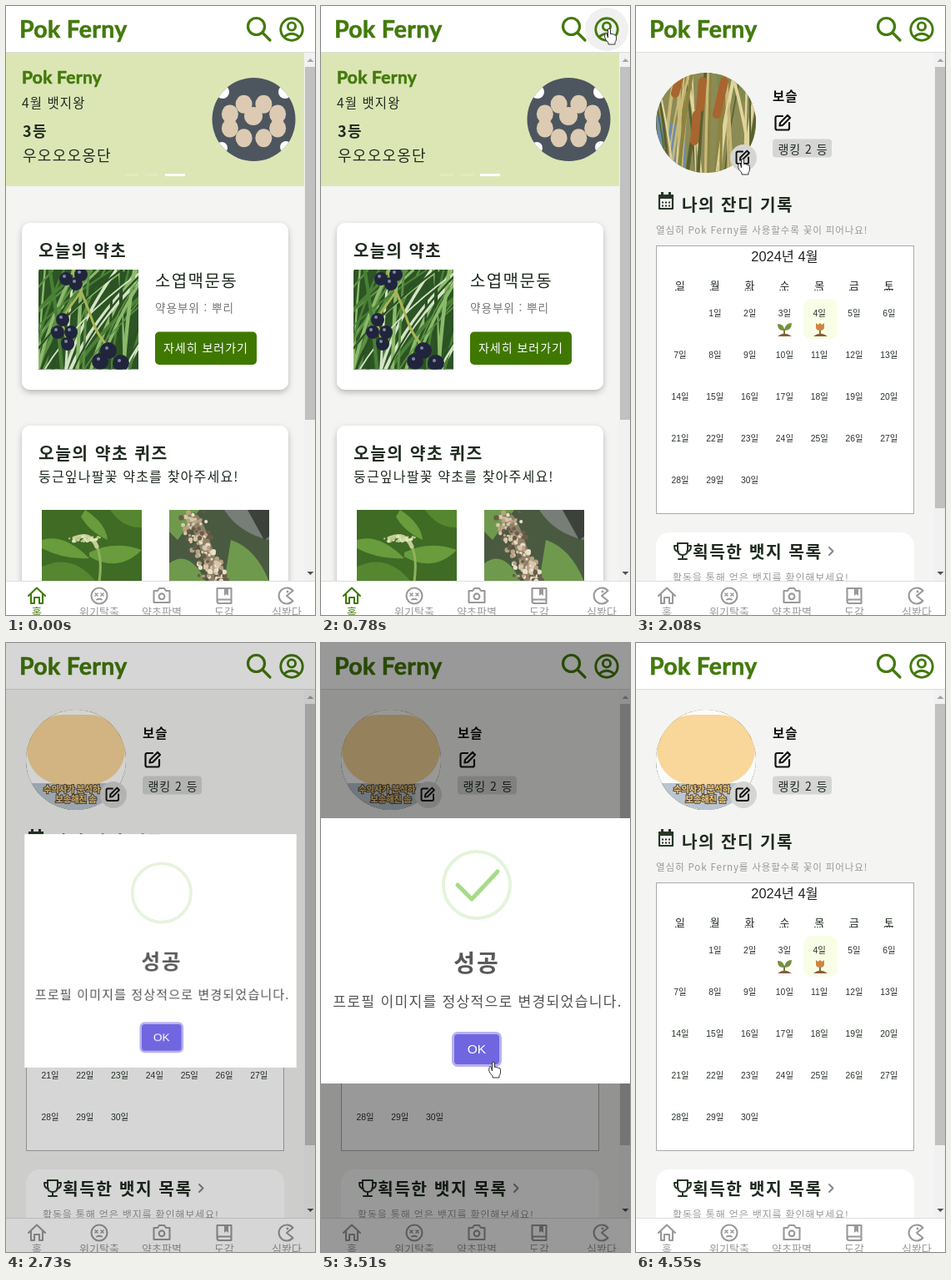
An HTML page that plays this animation: 371x730 px, repeating every 4.68 s.

```html
<!DOCTYPE html>
<html lang="ko">
<head>
<meta charset="utf-8">
<title>Pok Ferny</title>
<style>
  html, body { margin: 0; width: 100%; height: 100%; overflow: hidden; background: #f4f4f3; }
  svg { display: block; }
  text { font-family: "Noto Sans CJK KR", "Noto Sans KR", "Noto Sans", sans-serif; letter-spacing: .07em; fill: #1f2b20; }
  .b { font-weight: 700; }
  .mid { text-anchor: middle; }
  .logo { font-family: Lato, sans-serif; font-weight: 700; letter-spacing: .3px; fill: #437a0c; stroke: #437a0c; stroke-width: .6; stroke-linejoin: round; }
  .day { font: 10.4px "Liberation Sans", "Noto Sans CJK KR", sans-serif; letter-spacing: 0; fill: #2c352c; text-anchor: middle; }
  .week { font-size: 12.5px; font-weight: 500; letter-spacing: 0; text-anchor: middle; }
  .line { fill: none; stroke: currentColor; stroke-linecap: round; stroke-linejoin: round; }
  .tab { color: #999; stroke-width: 2.1; }
  .tab text { font-size: 13px; letter-spacing: 0; fill: currentColor; stroke: none; text-anchor: middle; }
  .tab .dot { fill: currentColor; stroke: none; }
  .caption { font-size: 10.5px; font-weight: 900; letter-spacing: -.3px; fill: #f2cf7c; stroke: #5d4b36; stroke-width: 2; paint-order: stroke; text-anchor: middle; }
  #popup { transform-origin: 185.5px 369px; }
  #profile, #newAvatar, #hover, #shade, #popup, #arrow, #hand { opacity: 0; }
</style>
</head>
<body>
<svg width="371" height="730" viewBox="0 0 371 730">
  <defs>
    <clipPath id="berryClip"><path d="M39 316h120v119.500H39z"/></clipPath>
    <clipPath id="leafClip"><path d="M43 604h120v86H43z"/></clipPath>
    <clipPath id="spikeClip"><path d="M196 604h120v86H196z"/></clipPath>
    <clipPath id="avatarClip"><circle cx="84" cy="140" r="60"/></clipPath>
    <clipPath id="badgeClip"><circle cx="297.500" cy="136" r="50"/></clipPath>
    <filter id="soft" x="-10%" y="-10%" width="120%" height="130%">
      <feDropShadow dx="0" dy="3" stdDeviation="3.500" flood-opacity=".25"/>
    </filter>
    <g id="edit" class="line" stroke-width="2.200">
      <path d="M0-8H-6.500Q-8.500-8-8.500-6V6.500Q-8.500 8.500-6.500 8.500H6Q8 8.500 8 6.500V0"/>
      <path d="M-3.500 3.500-3 0 6-9 9-6 0 3Z"/>
    </g>
  </defs>

  <rect width="371" height="730" fill="#f4f4f3"/>

  <g id="home">
    <path d="M0 56h358v160H0z" fill="#dce6b5"/>
    <text class="logo" x="19" y="93" font-size="21">Pok Ferny</text>
    <text x="19" y="122" font-size="15.500">4월 뱃지왕</text>
    <text class="b" x="20" y="157" font-size="18">3등</text>
    <text x="20" y="186" font-size="18">우오오오옹단</text>
    <path d="M143 202.500h16m8 0h16" stroke="#e3ebc4" stroke-width="2"/>
    <path d="M191 202.500h24" stroke="#fff" stroke-width="3"/>
    <g clip-path="url(#badgeClip)">
      <path d="M247 86h101v101H247z" fill="#4d565f"/>
      <g id="dolls" fill="#dccbb2"></g>
      <g fill="#fff">
        <circle cx="260" cy="103" r="8"/><circle cx="335" cy="103" r="8"/>
        <circle cx="259" cy="170" r="7"/><circle cx="336" cy="169" r="7"/>
      </g>
    </g>

    <g fill="#fff" filter="url(#soft)">
      <rect x="19" y="260" width="320" height="200" rx="10"/>
      <rect x="19" y="503" width="320" height="240" rx="10"/>
    </g>
    <text class="b" x="39" y="300.500" font-size="20">오늘의 약초</text>
    <g clip-path="url(#berryClip)">
      <path d="M39 316h120v120H39z" fill="#2c5424"/>
      <g id="grass"></g>
      <path class="line" d="M80 318Q98 360 104 378T126 412M88 345 66 376 74 404" stroke-width="3" color="#a9b555"/>
      <g id="berries" fill="#20253c"></g>
    </g>
    <text x="179" y="336.500" font-size="20">소엽맥문동</text>
    <text x="179" y="367" font-size="13.600" style="fill:#777">약용부위 : 뿌리</text>
    <rect x="179" y="390.500" width="122" height="39.500" rx="5" fill="#3f7800"/>
    <text x="189" y="415" font-size="14" style="fill:#fff">자세히 보러가기</text>

    <text class="b" x="39" y="543.500" font-size="20.400">오늘의 약초 퀴즈</text>
    <text x="39" y="570" font-size="16.100">둥근잎나팔꽃 약초를 찾아주세요!</text>
    <g clip-path="url(#leafClip)">
      <path d="M43 604h120v86H43z" fill="#3f6b25"/>
      <path d="M43 640Q70 632 100 662 70 664 43 650ZM100 655Q130 640 163 652 135 680 100 660ZM95 604Q120 620 122 640 100 630 90 612Z" fill="#689c3c"/>
      <path d="M43 672Q80 655 108 690H43ZM125 604H163V625Q140 626 125 604Z" fill="#54872f"/>
      <path class="line" d="M112 690Q116 660 108 646" color="#8fb35a" stroke-width="3"/>
      <path class="line" d="M109 648Q102 630 82 638" color="#c5cf95" stroke-width="5"/>
      <g id="petals"></g>
    </g>
    <g clip-path="url(#spikeClip)">
      <path d="M196 604h120v86H196z" fill="#4a5a41"/>
      <path d="M196 604H232L206 640 196 630ZM270 640Q300 650 316 690H262ZM196 668Q220 650 240 690H196Z" fill="#6f9a4d"/>
      <path d="M262 604H316V640Q280 632 262 604Z" fill="#777d77"/>
      <path d="M290 604 310 640 316 636V604Z" fill="#3c4139"/>
      <path class="line" d="M226 616Q240 640 251 690" color="#8e8168" stroke-width="14"/>
      <g id="blossom"></g>
    </g>
    <rect x="358" y="56" width="13" height="633" fill="#f1f1f1"/>
    <rect x="359" y="73" width="12" height="423" fill="#c1c1c1"/>
  </g>

  <g id="profile">
    <rect y="56" width="371" height="634" fill="#f4f4f3"/>
    <g clip-path="url(#avatarClip)">
      <path d="M24 80h120v120H24z" fill="#8c8a55"/>
      <path d="M24 130 60 150V200H24Z" fill="#6d8da8"/>
      <path d="M95 80H144V118L100 105Z" fill="#7f8a4d"/>
      <g id="reeds"></g>
      <path class="line" d="M52 86 47 105M80 90 77 122M106 90 97 130M73 130 70 162" color="#a9652f" stroke-width="10"/>
      <g id="newAvatar">
        <path d="M24 80h120v120H24z" fill="#fbfcfb"/>
        <path d="M24 168h120v32H24z" fill="#b9c5d2"/>
        <rect x="25" y="86" width="118" height="84" rx="44" fill="#f9d69a"/>
        <text class="caption" x="79" y="179">수의사가 분석하</text>
        <text class="caption" x="84" y="191">보송해진 솜</text>
      </g>
    </g>
    <circle cx="129" cy="182" r="16" fill="#d5d5d4"/>
    <use href="#edit" transform="translate(128 181.500) scale(.88)" color="#111"/>
    <text class="b" x="164" y="114" font-size="15.500" style="fill:#111">보슬</text>
    <use href="#edit" x="176" y="140" color="#111"/>
    <rect x="164" y="159.500" width="71" height="22" rx="4" fill="#d5d5d4"/>
    <text x="170.500" y="176.500" font-size="14">랭킹 2 등</text>

    <g color="#263626">
      <path class="line" d="M28 227H44V243H28Z" stroke-width="2.200"/>
      <path d="M27 226H45V231H27ZM30 223h3v4h-3zM39 223h3v4h-3z" fill="currentColor"/>
      <path d="M31 235.500h10M31 239.500h10" stroke="currentColor" stroke-width="2" stroke-dasharray="2 2"/>
    </g>
    <text class="b" x="55" y="245.500" font-size="20.200">나의 잔디 기록</text>
    <text x="24" y="273" font-size="11.600" style="fill:#999">열심히 Pok Ferny를 사용할수록 꽃이 피어나요!</text>

    <rect x="24.500" y="287.500" width="309" height="321" fill="#fff" stroke="#aaa"/>
    <text class="day" x="178.500" y="306" style="font-size:16.400px;fill:#222">2024년 4월</text>
    <rect x="201" y="351" width="41" height="49" rx="10" fill="#f8fee6"/>
    <g id="days"></g>
    <g>
      <path d="M170 396Q178 389 187 396Z" fill="#8a5a34"/>
      <path d="M178 393V387" stroke="#6f7d3c" stroke-width="2"/>
      <path d="M178 389Q170 390 170 381 178 381 178 389Q179 380 187 380 187 389 178 389Z" fill="#76903f"/>
    </g>
    <g>
      <path d="M213 396Q221 389 230 396Z" fill="#8a5a34"/>
      <path d="M221 393V388" stroke="#6f7d3c" stroke-width="2"/>
      <path d="M216 380 218.500 382 221 380 223.500 382 226 380V385Q226 389 221 389T216 385Z" fill="#cf8442"/>
    </g>

    <rect x="24" y="631" width="310" height="90" rx="16" fill="#fff"/>
    <path class="line" color="#263626" stroke-width="2" d="M50 644H62V652Q62 658 56 658T50 652ZM50 647H46Q46 654 51 654M62 647H66Q66 654 61 654M56 658V663M51 663H61"/>
    <text class="b" x="68" y="661.500" font-size="20.400">획득한 뱃지 목록</text>
    <path class="line" d="M232 649 236.500 653.500 232 658" color="#888" stroke-width="2"/>
    <text x="44" y="690" font-size="12" style="fill:#999">활동을 통해 얻은 뱃지를 확인해보세요!</text>
    <rect x="358" y="56" width="13" height="633" fill="#f1f1f1"/>
    <rect x="359" y="73" width="12" height="529" fill="#c1c1c1"/>
  </g>

  <path d="M361.500 67 365.500 63 369.500 67Z" fill="#a3a3a3"/>
  <path d="M361.500 678 365.500 682 369.500 678Z" fill="#505050"/>

  <rect width="371" height="55" fill="#fff"/>
  <path d="M0 55.500H371" stroke="#dcdcdc"/>
  <text class="logo" x="16" y="38" font-size="28.500">Pok Ferny</text>
  <circle id="hover" cx="343" cy="28" r="26" fill="#f0f0f0"/>
  <g class="line" color="#437a0c" stroke-width="3.200">
    <circle cx="300.500" cy="24.500" r="10"/><path d="M308 32 317 41"/>
    <circle cx="343" cy="28" r="13.200" stroke-width="2.900"/>
    <circle cx="343" cy="24.500" r="4.600" stroke-width="2.900"/>
    <path d="M334 37Q343 29.500 352 37" stroke-width="2.900"/>
  </g>

  <rect y="689" width="371" height="41" fill="#fff"/>
  <path d="M0 689.500H371" stroke="#dedede"/>
  <g class="tab line" id="homeTab" transform="translate(37 707)">
    <path d="M-10 0 0-9.500 10 0M-7-2V9H-3V2H3V9H7V-2"/><text y="24">홈</text>
  </g>
  <g class="tab line" transform="translate(112 707)">
    <circle r="9.500"/><path d="M-5-3-2 0M-2-3-5 0M2-3 5 0M5-3 2 0" stroke-width="1.600"/><path d="M-3 4.500Q0 3 3 4.500" stroke-width="1.800"/><text y="24">위기탈출</text>
  </g>
  <g class="tab line" transform="translate(187 707)">
    <path d="M-9.500-6H-5L-3-9H3L5-6H9.500V8H-9.500Z"/><circle r="3.400" cy=".8"/><text y="24">약초판별</text>
  </g>
  <g class="tab line" transform="translate(262 707)">
    <path d="M-8.500-9H8.500V9H-6Q-8.500 9-8.500 6.500ZM-8.500 6Q-8 4.500-6 4.500H8.500"/><path class="dot" d="M0-9H5V0L2.500-2 0 0Z"/><text y="24">도감</text>
  </g>
  <g class="tab line" transform="translate(337 707)">
    <path d="M7.500-6A9.500 9.500 0 1 0 7.500 6L0 0Z"/><circle class="dot" cx="1" cy="-5" r="1.400"/><text y="24">심봤다</text>
  </g>

  <rect id="shade" width="371" height="730" fill="rgba(0,0,0,.4)"/>
  <g id="popup">
    <rect y="210" width="371" height="318" fill="#fff"/>
    <circle cx="187" cy="290" r="40" fill="none" stroke="#e4f4db" stroke-width="4"/>
    <path id="tick" class="line" d="M164 290 181 307 212 274" pathLength="100" color="#a5dc86" stroke-width="5" stroke-dasharray="100 200"/>
    <text class="b mid" x="187" y="394" font-size="28" style="fill:#595959">성공</text>
    <text class="mid" x="188" y="435.500" font-size="17.200" style="fill:#545454">프로필 이미지를 정상적으로 변경되었습니다.</text>
    <rect x="158.500" y="467.500" width="57" height="39" rx="5.500" fill="#7066e0" stroke="#b7b2ef" stroke-width="3"/>
    <text class="day" x="187" y="492" style="font-size:15.500px;fill:#fff">OK</text>
  </g>

  <path id="arrow" d="M0 0V13.500L3.200 10.700 5.500 15.500 7.600 14.500 5.400 9.800H9.700Z" fill="#fff" stroke="#222" stroke-width=".9"/>
  <path id="hand" d="M-1.500 1Q0-.8 1.500 1V6.500Q3.500 5.500 4 7 6 6 6.500 8 8.500 7 8.500 9.500V13Q8.500 15 7 16.500V19H-1V17Q-5 13-5.500 10-4-0-1.500 11Z" fill="#fff" stroke="#222" stroke-width=".9"/>
</svg>
<script>
const $ = id => document.getElementById(id);
const STEP = 130, COUNT = 36;

function add(parent, tag, attrs, text = '') {
  const el = document.createElementNS('http://www.w3.org/2000/svg', tag);
  for (const k in attrs) el.setAttribute(k, attrs[k]);
  el.textContent = text;
  $(parent).append(el);
}

// Small repeated parts
let seed = 7;
const rand = () => (seed = seed * 16807 % 2147483647) / 2147483647;

function blades(id, x, y, size, count, lean, spread, colors) {
  for (let i = 0; i < count; i++) {
    const x0 = x - lean + rand() * (size + lean), tilt = lean + (rand() - .5) * spread;
    add(id, 'path', {
      d: `M${x0} ${y + size}Q${x0 + tilt * .3} ${y + size / 2} ${x0 + tilt} ${y}`,
      fill: 'none', stroke: colors[i % colors.length], 'stroke-width': 1.5 + rand() * 3
    });
  }
}
blades('grass', 39, 316, 120, 46, 60, 150, ['#5b9044', '#8cba6b', '#2a5122', '#d5e3c6', '#4a8036']);
blades('reeds', 24, 80, 120, 36, 0, 50, ['#c9b877', '#59602f', '#e0d49c', '#8b8440']);

// Specks scattered along a straight stalk
function specks(id, x1, y1, x2, y2, width, count, size, colors) {
  for (let i = 0; i < count; i++) {
    const p = rand();
    add(id, 'circle', {
      cx: x1 + (x2 - x1) * p + (rand() - .5) * width,
      cy: y1 + (y2 - y1) * p + (rand() - .5) * width / 2,
      r: size * (.6 + rand() * .7), fill: colors[i % colors.length]
    });
  }
}
specks('petals', 82, 639, 108, 638, 12, 40, 1.7, ['#e3e5bd', '#b9c888', '#d3daa6']);
specks('blossom', 224, 610, 252, 692, 30, 130, 2.5, ['#e9decb', '#b9a184', '#d6c6aa', '#6b5c4a']);

[[72, 327], [84, 333], [90, 322], [68, 376], [62, 391], [78, 391], [74, 405], [123, 413], [113, 426], [138, 428]]
  .forEach(([cx, cy]) => {
    add('berries', 'circle', { cx, cy, r: cx > 100 ? 10 : 8 });
    add('berries', 'circle', { cx: cx - 2, cy: cy - 3, r: 2, fill: '#7e88a6' });
  });

for (let i = 0; i < 8; i++) {
  const a = (i + .5) * Math.PI / 4;
  add('dolls', 'ellipse', { cx: 297.5 + 31 * Math.cos(a), cy: 138 + 22 * Math.sin(a), rx: 10, ry: 11 });
}
add('dolls', 'ellipse', { cx: 297, cy: 132, rx: 11, ry: 11 });

const column = i => 53 + 41.8 * i;
[...'일월화수목금토'].forEach((name, i) => {
  const x = column(i);
  add('days', 'text', { class: 'week', x, y: 339.5 }, name);
  add('days', 'path', { d: `M${x - 6} 340.5h12`, stroke: '#333', 'stroke-dasharray': '1.500 1.500' });
});
for (let d = 1; d <= 30; d++)
  add('days', 'text', { class: 'day', x: column(d % 7), y: 372 + 50 * Math.floor(d / 7) }, d + '일');

// Each key is [step, style], held until the next one
function track(id, keys) {
  const frames = keys.map(([n, style]) => ({ offset: n / COUNT, easing: 'step-end', ...style }));
  frames.push({ ...keys[keys.length - 1][1], offset: 1 });
  $(id).animate(frames, { duration: STEP * COUNT, iterations: Infinity });
}
const fade = (id, ...keys) => track(id, keys.map(([n, opacity]) => [n, { opacity }]));

fade('home', [0, 1], [7, 0]);
fade('profile', [0, 0], [7, 1]);
fade('newAvatar', [0, 0], [21, 1]);
fade('hover', [0, 0], [5, 1], [7, 0]);
fade('shade', [0, 0], [21, .4], [22, 1], [30, .04], [31, 0]);
track('homeTab', [[0, { color: '#437a0c' }], [7, { color: '#999' }]]);
track('popup', [[0, 0, 1], [21, 1, .88], [22, 1, .993], [23, 1, 1], [30, .09, .62], [31, 0, 1]]
  .map(([n, opacity, s]) => [n, { opacity, transform: `scale(${s})` }]));
track('tick', [[0, 101], [24, 92], [25, 45], [26, 0]]
  .map(([n, strokeDashoffset]) => [n, { strokeDashoffset }]));

// Pointer path: step, x, y, shape
const path = [
  [0, 310, 740, ''], [1, 322, 640, 'arrow'], [2, 338, 420, 'arrow'], [3, 344, 200, 'arrow'],
  [4, 346, 72, 'arrow'], [5, 346, 31, 'hand'], [6, 346, 27, 'hand'], [7, 322, 42, 'arrow'],
  [8, 242, 94, 'arrow'], [9, 161, 144, 'arrow'], [10, 136, 176, 'hand'], [11, 128, 183, 'hand'],
  [21, 290, 700, ''], [25, 262, 640, 'arrow'], [26, 225, 545, 'arrow'], [27, 207, 502, 'hand'],
  [28, 206, 499, 'hand'], [30, 207, 500, 'arrow'], [31, 216, 580, 'arrow'], [32, 228, 680, 'arrow'],
  [33, 234, 740, '']
];
for (const shape of ['arrow', 'hand'])
  track(shape, path.map(([n, x, y, on]) =>
    [n, { opacity: +(on === shape), transform: `translate(${x}px, ${y}px)` }]));
</script>
</body>
</html>
```
